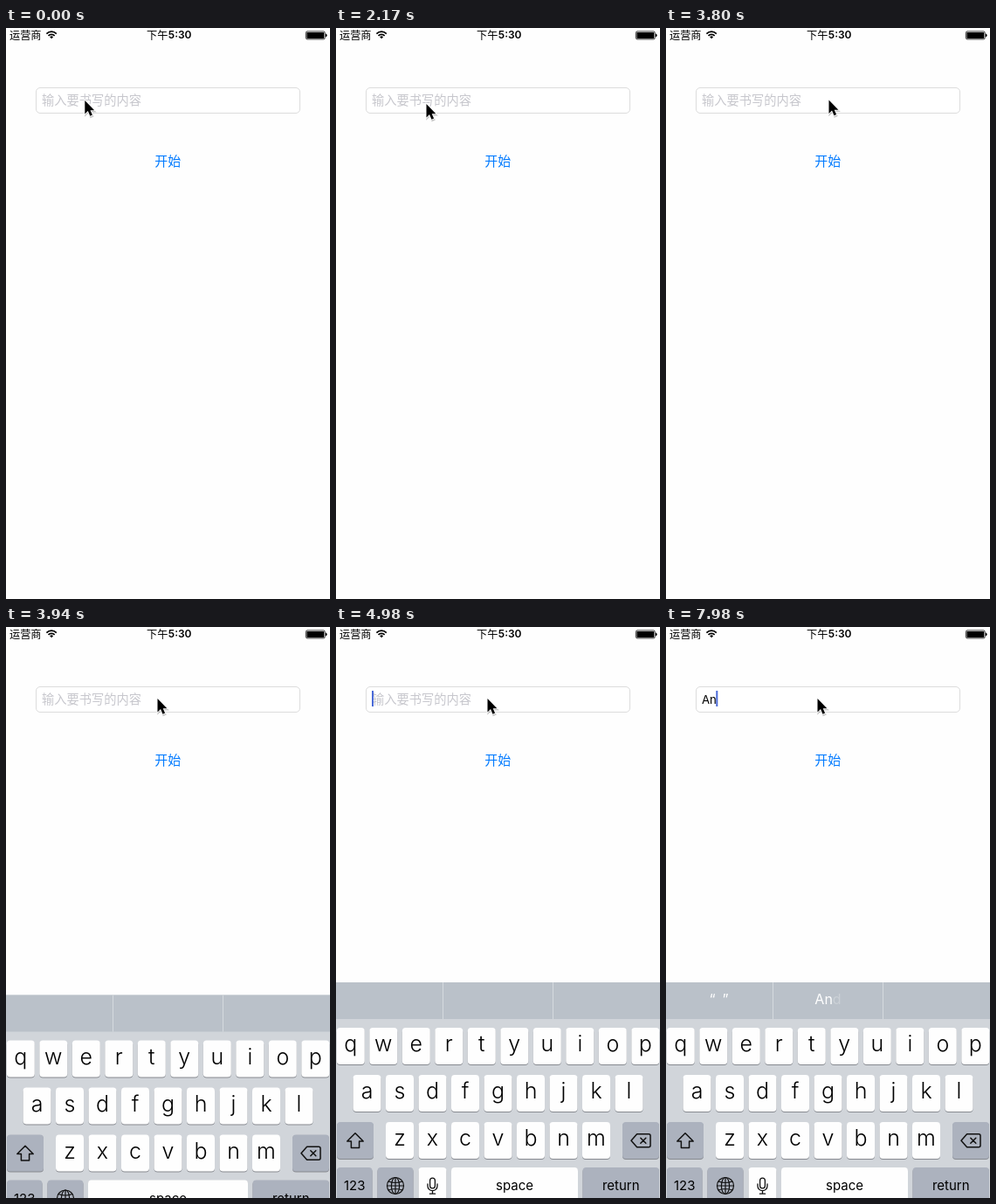
These frames come from a looping animation (371 by 654 pixels, 8000 ms). An HTML page:

```html
<!DOCTYPE html>
<html lang="zh-CN">
<head>
<meta charset="utf-8">
<title>Handwriting input</title>
<style>
  html, body { margin: 0; width: 100%; height: 100%; overflow: hidden; background: #fefefe; }
  svg { display: block; width: 371px; height: 654px; }
  text { font-family: Inter, "Noto Sans CJK SC", "Noto Sans CJK", sans-serif; white-space: pre; }
  .line { fill: none; stroke: #111; stroke-width: 1.5; stroke-linejoin: round; stroke-linecap: round; }
  .mid { text-anchor: middle; }
  .letter { font-size: 25px; font-weight: 350; }
  .label { font-size: 15px; }
  .word { font-size: 16px; fill: #fff; }
</style>
</head>
<body>
<svg viewBox="0 0 371 654">
  <rect width="371" height="654" fill="#fefefe"/>

  <text x="4" y="12.6" font-size="12.2">运营商</text>
  <g fill="none" stroke="#000" stroke-width="1.7">
    <path d="M46.4 6.6a8 8 0 0 1 11.4 0M48.5 8.9a5 5 0 0 1 7.2 0"/>
    <path d="M52.1 12.3l-2-2.1a3 3 0 0 1 4 0z" fill="#000" stroke="none"/>
  </g>
  <text x="161" y="12.6" font-size="12.2" font-weight="500">下午</text>
  <text x="185.8" y="12.4" font-size="12" font-weight="600">5:30</text>
  <rect x="343.4" y="3.9" width="21.8" height="9" rx="1.6" fill="none" stroke="#000" stroke-width=".8"/>
  <rect x="344.4" y="4.9" width="19.8" height="7" rx=".6"/>
  <path d="M366 6.6q1.6.3 1.6 1.8t-1.6 1.8z"/>

  <rect x="34.5" y="68.5" width="302" height="29" rx="4.5" fill="#fff" stroke="#dcdcdc"/>
  <text id="hint" x="41" y="87.8" font-size="14.25" font-weight="350" fill="#c7c7cd">输入要书写的内容</text>
  <text id="typed" x="41" y="87.5" font-size="13.2"></text>
  <rect id="caret" y="73" width="2" height="18" fill="#4a6ad8"/>
  <text class="mid" x="185.2" y="158.4" font-size="15" fill="#007aff">开始</text>

  <g id="keyboard">
    <rect y="407" width="371" height="260" fill="#d1d5da"/>
    <rect y="407" width="371" height="42" fill="#bac1c9"/>
    <path d="M122.5 407v42M248.5 407v42" stroke="#d6dade"/>
    <g id="words"></g>
    <g id="keys"></g>
    <path class="line" d="M22 579.8l9.2 9.2h-4.6v7.4h-9.2v-7.4h-4.6z"/>
    <path class="line" d="M338 588.2l6.6-7.4h13.4q2 0 2 2v11q0 2-2 2h-13.4zM348.8 585.2l6 6m0-6l-6 6"/>
    <g class="line" style="stroke-width:1.2" transform="translate(68 640)">
      <circle r="9.5"/><ellipse rx="4.6" ry="9.5"/>
      <path d="M0-9.5v19M-9.5 0h19M-8-5q8 3 16 0M-8 5q8-3 16 0"/>
    </g>
    <g id="mic">
      <path class="line" style="stroke-width:1.3" d="M107.6 634a2.9 2.9 0 0 1 5.8 0v6a2.9 2.9 0 0 1-5.8 0zM105 638v2.2a5.5 5.5 0 0 0 11 0v-2.2M110.5 645.8v3.4M107.4 649.2h6.2"/>
    </g>
  </g>

  <g id="pointer">
    <path d="M0 0v15.4l3.5-3.3 2.5 5.6 2.6-1.1-2.4-5.4h4.7z" transform="translate(.6 1.4)" fill="#000" opacity=".22" stroke="#000" stroke-width="1.6"/>
    <path d="M0 0v15.4l3.5-3.3 2.5 5.6 2.6-1.1-2.4-5.4h4.7z" fill="#000" stroke="#fff" stroke-width="1.8" paint-order="stroke"/>
  </g>
</svg>
<script>
const LOOP = 8000;
const $ = id => document.getElementById(id);

function add(parent, tag, attrs, content = "") {
  const node = document.createElementNS("http://www.w3.org/2000/svg", tag);
  for (const name in attrs) node.setAttribute(name, attrs[name]);
  node.textContent = content;
  return parent.appendChild(node);
}

function addKey(parent, x, y, width, label = "", dark = false, type = "label") {
  const key = add(parent, "g", {});
  const box = { x, y, width, height: 42, rx: 4 };
  add(key, "rect", { ...box, y: y + 1, fill: "#878a90" });
  add(key, "rect", { ...box, fill: dark ? "#acb2be" : "#fefefe" });
  const baseline = y + (type === "letter" ? 27.3 : 26);
  add(key, "text", { x: x + width / 2, y: baseline, class: "mid " + type }, label);
  return key;
}

const keys = $("keys");
[["qwertyuiop", 0.8, 459], ["asdfghjkl", 19.5, 513], ["zxcvbnm", 57, 567]].forEach(([row, left, y]) =>
  [...row].forEach((letter, i) => addKey(keys, left + i * 37.5, y, 32, letter, false, "letter")));
addKey(keys, 1, 567, 42, "", true);
addKey(keys, 328, 567, 42, "", true);
addKey(keys, 1, 619, 40.5, "123", true);
addKey(keys, 47.5, 619, 41, "", true);
addKey(keys, 282.5, 619, 87.5, "return", true);
const wideSpace = addKey(keys, 94, 619, 183, "space");
const shortSpace = addKey(keys, 132, 619, 145, "space");
$("mic").prepend(addKey(keys, 94.5, 619, 32));

const slots = [60.5, 185.5, 310].map(x => add($("words"), "text", { x, y: 432.3, class: "mid word" }));

// Each row: start time, value held until the next row.
const pointerSteps = [
  [0, [90.3, 83]], [690, [101, 83]], [840, [111, 83]],
  [1140, [121, 83]], [1290, [137, 83]], [1440, [152, 83]], [1580, [165, 84]],
  [1730, [155, 85]], [1880, [137, 86]], [2020, [118, 86]], [2170, [103.5, 87]],
  [2320, [108, 91]], [2470, [124, 90]], [2610, [144, 87]], [2760, [158, 84]], [2900, [165, 83]],
  [3500, [174, 83]], [3650, [183, 83]], [3800, [186.5, 82.5]], [3940, [173.5, 82]]
];
const keyboardSteps = [[0, null], [3940, 14.5], [4090, 0]];
const typedSteps = [[0, ""], [7380, "A"], [7980, "An"]];
const caretSteps = [[0, 41], [7380, 50.2], [7980, 57.3]];

// Letters of a suggestion appear one after another.
const fade = (word, progress) => [...word].map((letter, i) =>
  [letter, Math.min(1, Math.max(0, progress - 0.4 * i))]);
const row = (words, progress) => words.map(word => fade(word, progress));
const opening = ["I", "the", "I’m"], afterA = ["“A”", "An", "And"];
const wordSteps = [
  [0, row(["", "", ""], 0)],
  [6780, row(opening, 0.65)], [6930, row(opening, 1.3)], [7080, row(opening, 2)],
  [7530, row(afterA, 0.65)], [7680, row(afterA, 1.3)], [7830, row(afterA, 2)],
  [7980, [[["“", 1], ["A", 0], ["”", 1]], [["A", 1], ["n", 1], ["d", 0.25]], []]]
];

const at = (steps, time) => steps.findLast(([start]) => start <= time)[1];
const show = (node, visible) => node.setAttribute("visibility", visible ? "inherit" : "hidden");

let shownWords;
function drawWords(words) {
  if (words === shownWords) return;
  shownWords = words;
  slots.forEach((slot, i) => {
    slot.textContent = "";
    for (const [letter, alpha] of words[i]) add(slot, "tspan", { "fill-opacity": alpha }, letter);
  });
}

function draw(time) {
  $("pointer").setAttribute("transform", `translate(${at(pointerSteps, time)})`);

  const drop = at(keyboardSteps, time);
  show($("keyboard"), drop !== null);
  $("keyboard").setAttribute("transform", `translate(0 ${drop ?? 0})`);

  const ready = time >= 4980;
  show(wideSpace, !ready);
  show(shortSpace, ready);
  show($("mic"), ready);
  show($("caret"), ready);
  $("caret").setAttribute("x", at(caretSteps, time));

  const typed = at(typedSteps, time);
  $("typed").textContent = typed;
  show($("hint"), !typed);
  drawWords(at(wordSteps, time));
}

const began = performance.now();
function tick() {
  draw((performance.now() - began) % LOOP);
  requestAnimationFrame(tick);
}
tick();
</script>
</body>
</html>
```
